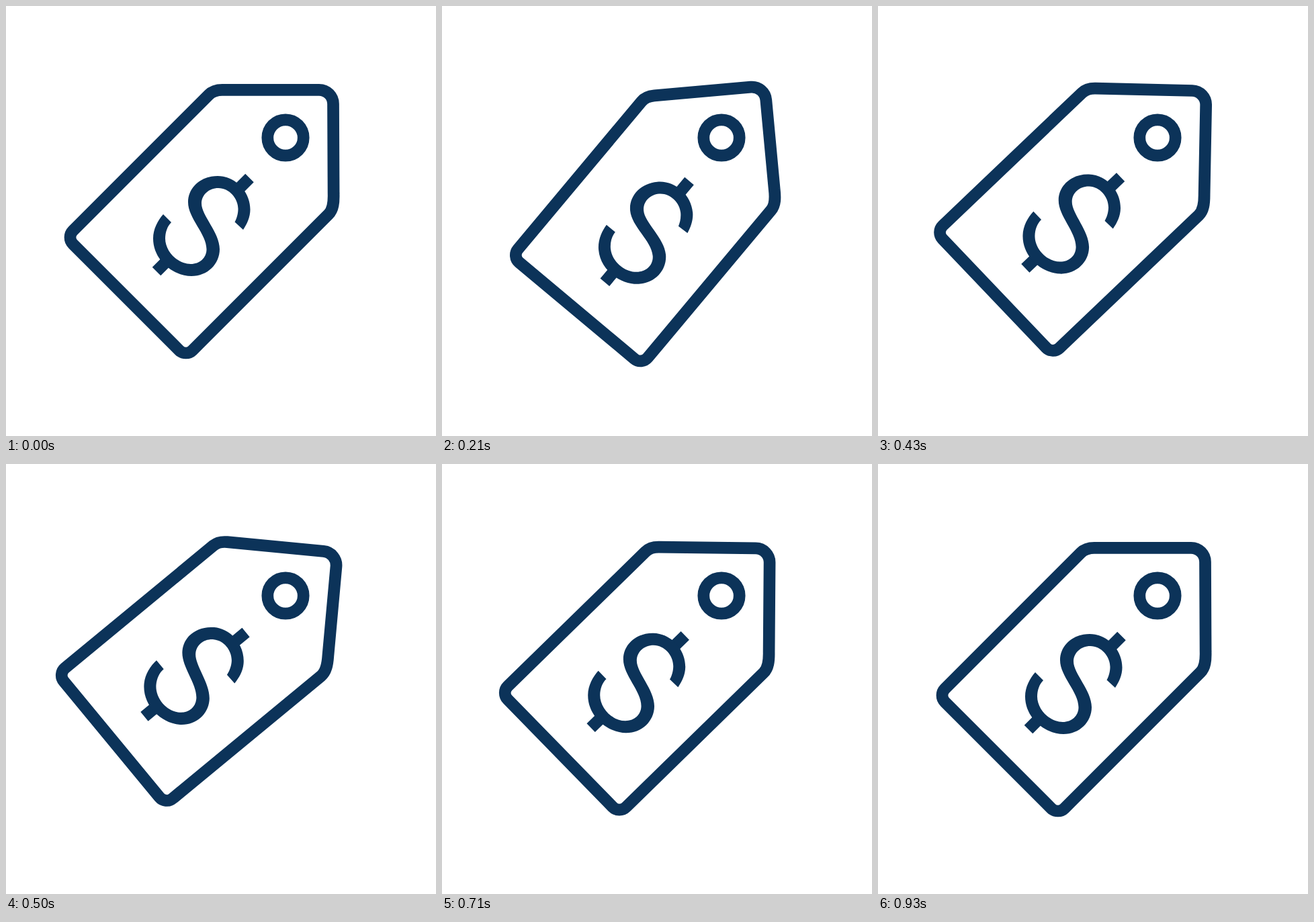
These frames come from a looping animation (640x640 px, 1140 ms). An HTML page:

```html
<!DOCTYPE html>
<html>
<head>
<meta charset="utf-8">
<style>
  html, body { margin: 0; width: 100%; height: 100%; overflow: hidden; background: #fff; }
  svg { display: block; width: 100%; height: 100%; }
</style>
</head>
<body>
<svg viewBox="0 0 640 640" fill="none" stroke="#0c3359" stroke-width="17.7">
  <g id="tag">
    <path d="M322 124.8H466A21 21 0 0 1 487 146L487.6 279C488 292 487 303 480 310
      L277.6 512.4A14 14 0 0 1 257.8 512.4L99.6 354.2A14 14 0 0 1 99.6 334.4
      L302 132C307 127 313 124.8 322 124.8Z"/>
    <path d="M362.5 256L343 275.5M224 395L242 377"/>
    <path fill="#0c3359" stroke="none" d="M234 310C226 319 219 332 219 346C219 379 250 402 276 402
      C300 402 318 384 318 362C318 337 291 312 291 294C291 281 302 271 316 271
      C332 271 345.5 286 345.5 302C345.5 310 343 317 340.5 321.5L353 333
      C359 324 363.5 314 363.5 303C363.5 276 341 253 315 253C290 253 271 270 271 292
      C271 316 298.5 339 298.5 362C298.5 375 288 384 275 384
      C255 384 237 365 237 346C237 337 240 328 246 322Z"/>
  </g>
  <circle cx="416" cy="196" r="26.7"/>
</svg>
<script>
const LOOP = 1140;
const tag = document.getElementById('tag');

// Swing keys: [step, degrees], at 14 steps per second
const keys = [[1, 0], [3.3, -5.3], [4.4, -5.3], [7.2, 5.6], [8.55, 5.6], [11, -2.05], [13, 0]];

const ease = p => (1 - Math.cos(Math.PI * p)) / 2;

function angleAt(step) {
  const i = keys.findIndex(([k]) => k > step);
  if (i < 1) return 0;
  const [k0, a0] = keys[i - 1], [k1, a1] = keys[i];
  return a0 + (a1 - a0) * ease((step - k0) / (k1 - k0));
}

function draw(now) {
  const t = (now - start) % LOOP;
  // Step changes fall on whole hundredths of a second
  const step = Math.floor((Math.floor(t / 10) + 0.5) * 0.14);
  tag.setAttribute('transform', `rotate(${angleAt(step)} 416 196)`);
}

function loop() {
  draw(performance.now());
  requestAnimationFrame(loop);
}

const start = performance.now();
loop();
</script>
</body>
</html>
```
